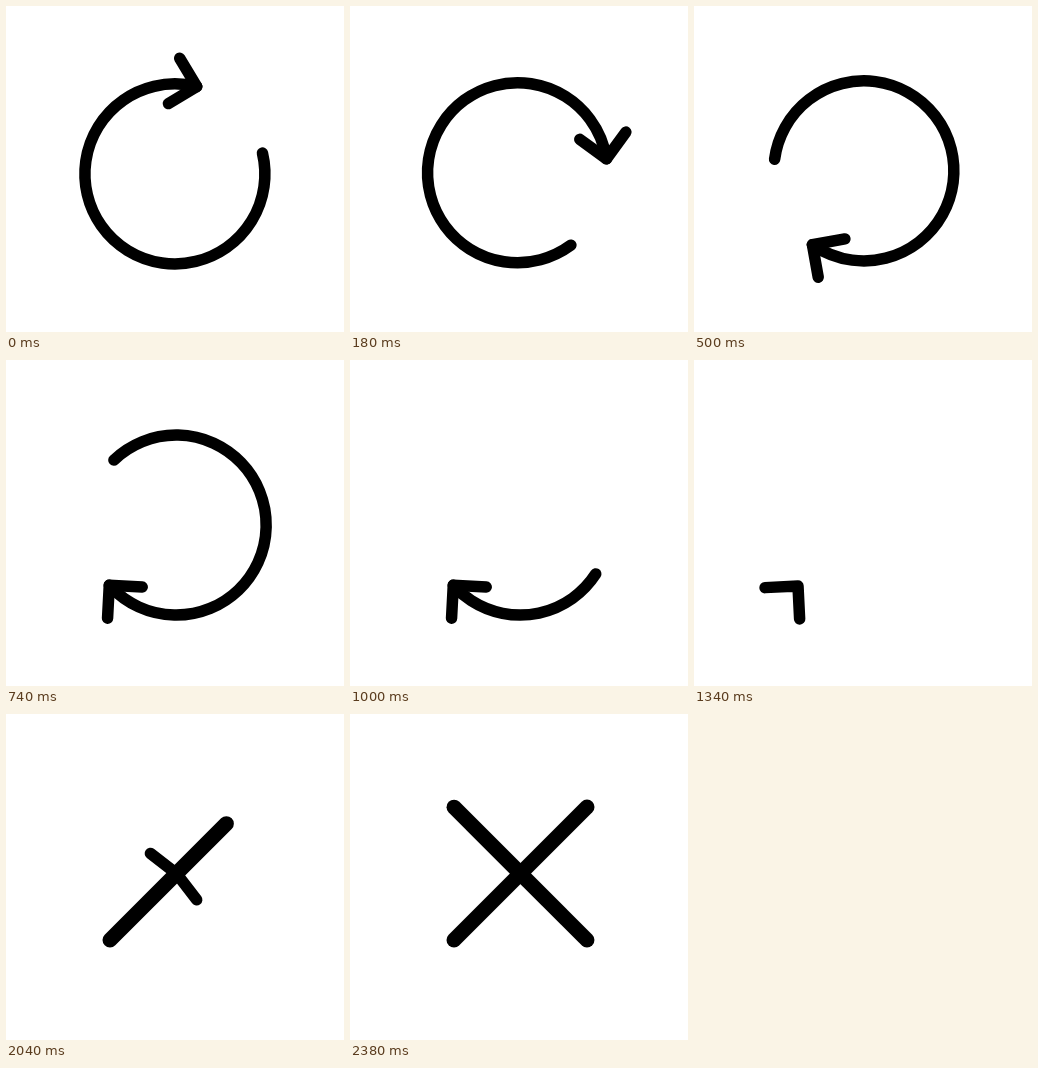
Animation of 338x326 px, one loop 3.9 s. Source, as an HTML page with a canvas:

```html
<!DOCTYPE html>
<html lang="en">
<head>
<meta charset="utf-8">
<title>Refresh to close</title>
<style>
  html, body { margin: 0; width: 100%; height: 100%; overflow: hidden; background: #fff; }
  canvas { display: block; width: 338px; height: 326px; }
</style>
</head>
<body>
<canvas id="stage"></canvas>
<script>
const W = 338, H = 326, LOOP = 3900, STEP = 20;
const RAD = Math.PI / 180;

const canvas = document.getElementById('stage');
const ratio = window.devicePixelRatio || 1;
canvas.width = W * ratio;
canvas.height = H * ratio;
const ctx = canvas.getContext('2d');

// Ring, measured in degrees; the pivot sits slightly off its centre
const pivot = { x: 169.1, y: 166.3 };
const offset = { x: -0.2, y: 1.6 };
const RADIUS = 90, TAIL = -13.4, TIP = 284, SPIN = 214;

// Cross
const start = { x: 104, y: 226 };
const middle = { x: 170.5, y: 159.6 };
const end = { x: 237, y: 93 };
const ARM = 94, BARB = 33;
const THIN = 11.5, THICK = 15;

// Moments when one phase hands over to the next
const SPUN = 690, TRIMMED = 1164, TURNED = 1388, CENTRED = 1760, CROSSED = 2180, DONE = 2380;

const clamp = v => Math.min(1, Math.max(0, v));
const span = (t, from, to) => clamp((t - from) / (to - from));
const mix = (a, b, p) => a + (b - a) * p;
const mixPoint = (a, b, p) => ({ x: mix(a.x, b.x, p), y: mix(a.y, b.y, p) });
const polar = (c, r, deg) => ({ x: c.x + r * Math.cos(deg * RAD), y: c.y + r * Math.sin(deg * RAD) });
const sine = p => (1 - Math.cos(Math.PI * p)) / 2;

function bezier(x1, y1, x2, y2) {
  const at = (a, b, s) => 3 * a * s * (1 - s) ** 2 + 3 * b * s * s * (1 - s) + s ** 3;
  return p => {
    let lo = 0, hi = 1;
    for (let i = 0; i < 30; i++) {
      const mid = (lo + hi) / 2;
      if (at(x1, x2, mid) < p) lo = mid; else hi = mid;
    }
    return at(y1, y2, (lo + hi) / 2);
  };
}
const settle = bezier(0.33, 0.24, 0.35, 1);

function stroke(width, points) {
  ctx.lineWidth = width;
  ctx.beginPath();
  points.forEach(p => ctx.lineTo(p.x, p.y));
  ctx.stroke();
}

function head(tip, dir, spread = 45, length = BARB, width = THIN) {
  stroke(width, [
    polar(tip, length, dir + 180 - spread),
    tip,
    polar(tip, length, dir + 180 + spread)
  ]);
}

function ring(t) {
  const turn = SPIN * settle(span(t, 24, SPUN));
  const tail = mix(TAIL, TIP, span(t, 700, TRIMMED));
  const shift = Math.hypot(offset.x, offset.y);
  const lean = Math.atan2(offset.y, offset.x) / RAD;
  const c = polar(pivot, shift, lean + turn);

  ctx.lineWidth = THIN;
  ctx.beginPath();
  ctx.arc(c.x, c.y, RADIUS, (tail + turn) * RAD, (TIP + turn) * RAD);
  ctx.stroke();
  head(polar(c, RADIUS, TIP + turn), TIP + turn + 90);
}

function cross(t) {
  const dir = mix(TIP + SPIN - 270, 315, settle(span(t, TRIMMED, TURNED)));
  const toMiddle = sine(span(t, 1396, CENTRED));
  const toEnd = sine(span(t, CENTRED, CROSSED));
  const open = sine(span(t, CENTRED, 2140));
  const grow = sine(span(t, 2140, DONE));

  const tip = mixPoint(start, middle, toMiddle);
  if (toMiddle > 0) stroke(THICK, [start, toEnd > 0 ? mixPoint(middle, end, toEnd) : tip]);
  head(tip, dir, mix(45, 90, open), mix(BARB, ARM, grow), mix(THIN, THICK, grow));
}

function draw(t) {
  ctx.setTransform(ratio, 0, 0, ratio, 0, 0);
  ctx.fillStyle = '#fff';
  ctx.fillRect(0, 0, W, H);
  ctx.strokeStyle = '#000';
  ctx.lineCap = ctx.lineJoin = 'round';
  if (t < TRIMMED) ring(t); else cross(t);
}

const origin = performance.now();
function frame() {
  const t = (performance.now() - origin) % LOOP;
  draw(Math.floor(t / STEP) * STEP);
  requestAnimationFrame(frame);
}
frame();
</script>
</body>
</html>
```
